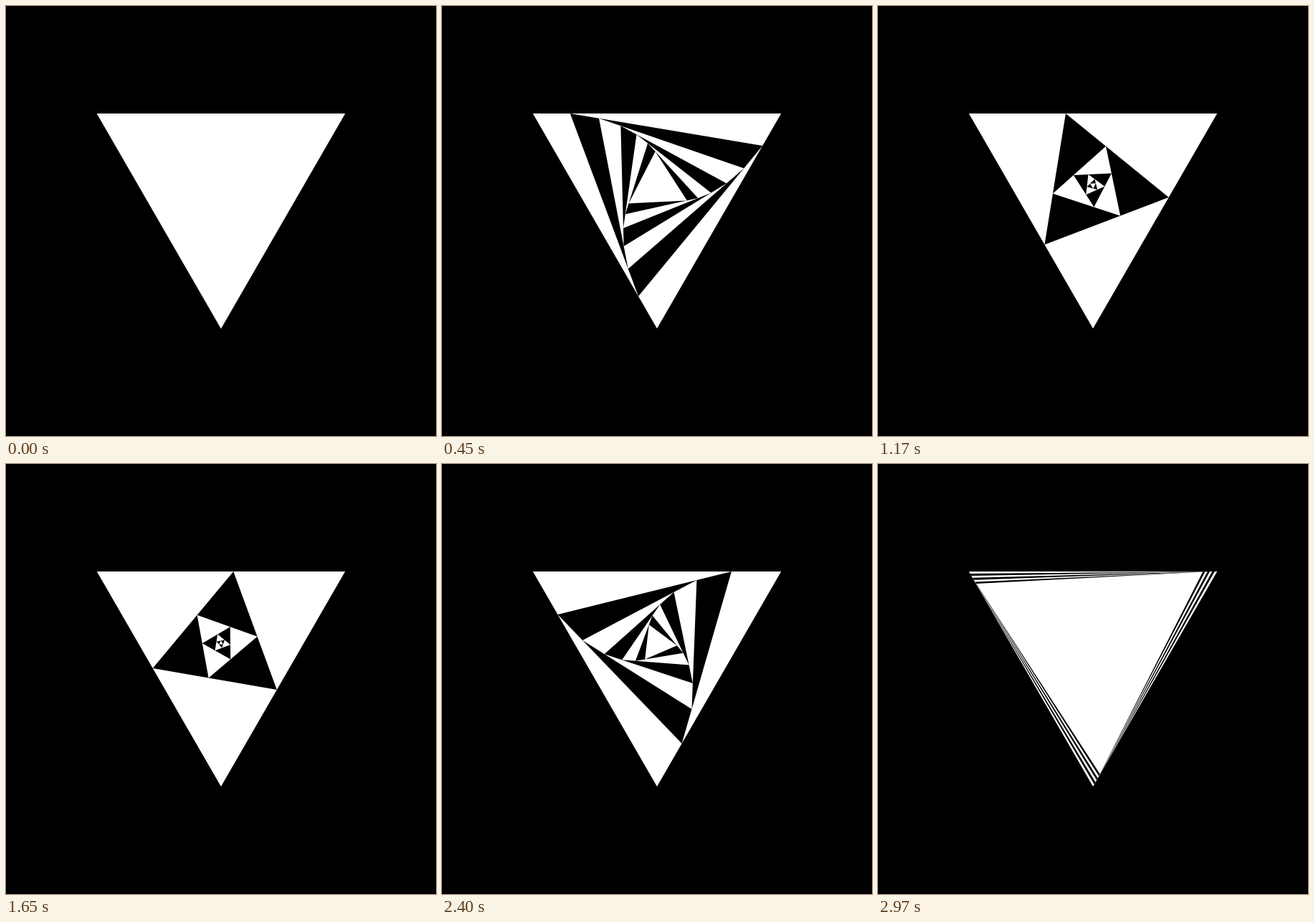
Animation, 600 px wide and 600 px high, one loop 3 s. Source, as an HTML page with a canvas:

```html
<!DOCTYPE html>
<html lang="en">
<head>
<meta charset="utf-8">
<title>Nested triangles</title>
<style>
  html, body { margin: 0; width: 100%; height: 100%; overflow: hidden; background: #000; }
  canvas { display: block; }
</style>
</head>
<body>
<canvas id="stage" width="600" height="600"></canvas>
<script>
const ctx = document.getElementById('stage').getContext('2d');
const STEPS = 100, STEP_MS = 30, LEVELS = 7;
const RADIUS = 200, CX = 300, CY = 250;

const outer = [210, 330, 90].map(deg => {
  const a = deg * Math.PI / 180;
  return [CX + RADIUS * Math.cos(a), CY + RADIUS * Math.sin(a)];
});

// Slide each corner along its side by the fraction t.
function slide(points, t) {
  return points.map(([x, y], i) => {
    const [nx, ny] = points[(i + 1) % points.length];
    return [x + (nx - x) * t, y + (ny - y) * t];
  });
}

function fillShape(points, color) {
  ctx.fillStyle = color;
  ctx.beginPath();
  points.forEach(([x, y]) => ctx.lineTo(x, y));
  ctx.fill();
}

function draw(ms) {
  const t = Math.floor(ms / STEP_MS) % STEPS / STEPS;
  ctx.fillStyle = '#000';
  ctx.fillRect(0, 0, 600, 600);
  let points = outer;
  for (let level = 0; level < LEVELS; level++) {
    fillShape(points, level % 2 ? '#000' : '#fff');
    points = slide(points, t);
  }
}

function tick() {
  draw(performance.now());
  requestAnimationFrame(tick);
}
tick();
</script>
</body>
</html>
```
